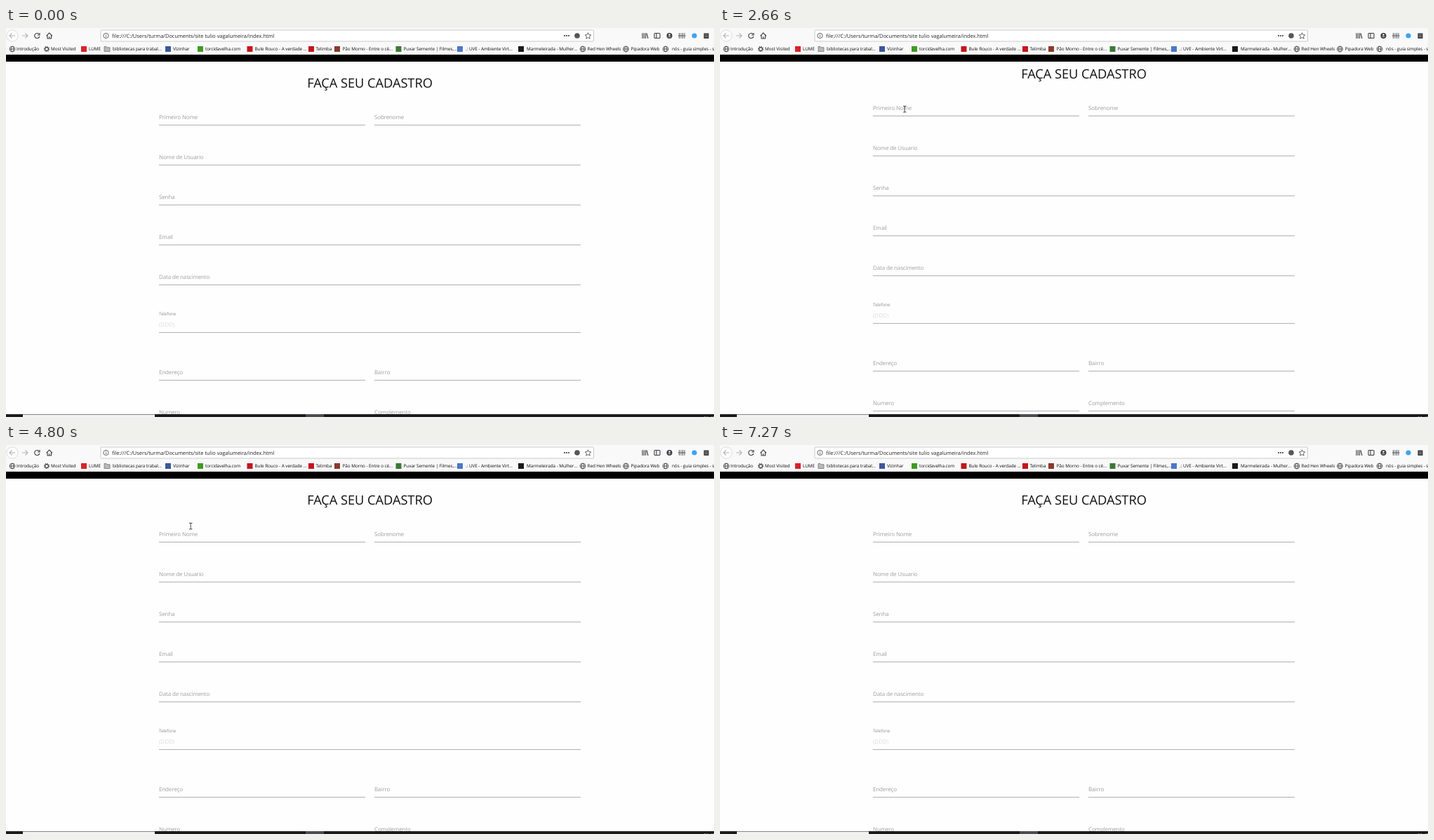
An HTML page that plays this animation: 1009 px wide and 555 px high, repeating every 8 s.

```html
<!DOCTYPE html>
<html lang="pt-BR">
<head>
<meta charset="utf-8">
<title>Cadastro</title>
<style>
  html, body { margin: 0; width: 100%; height: 100%; overflow: hidden; background: #fff; }
  svg { display: block; width: 100vw; height: 100vh; }
  text { font-family: "Open Sans", "Noto Sans", sans-serif; text-rendering: geometricPrecision; white-space: pre; }
  .title { font-size: 18.3px; letter-spacing: -.06px; fill: #111; text-anchor: middle; }
  .label { font-size: 8px; letter-spacing: -.13px; fill: #9e9e9e; }
  .small { font-size: 6.3px; letter-spacing: -.12px; fill: #8f8f8f; }
  .hint { font-size: 8px; fill: #dcdcdc; }
  .send { font-size: 7.5px; letter-spacing: .3px; fill: #fff; text-anchor: middle; }
  .url { font-size: 7.4px; fill: #222; }
  .mark { font-size: 6.4px; letter-spacing: -.06px; fill: #0c0c0d; }
  .rule { stroke: #b0b0b0; }
  .ink { fill: none; stroke: #3c3c40; stroke-width: 1.1; }
  .thin { stroke-width: .8; }
  .dim { stroke: #b4b4b6; }
</style>
</head>
<body>
<svg viewBox="0 0 1009 555" preserveAspectRatio="none">
  <defs><clipPath id="view"><rect y="48" width="1009" height="503"/></clipPath></defs>
  <rect width="1009" height="555" fill="#fefefe"/>
  <g clip-path="url(#view)"><g id="page"></g></g>

  <rect width="1009" height="38" fill="#f9f9fa"/>
  <rect y="38" width="1009" height="10" fill="#000"/>
  <rect x="135" y="3" width="702.5" height="16" rx="1" fill="#fff" stroke="#c4c4c6" stroke-width=".9"/>
  <g class="ink">
    <circle cx="9" cy="11" r="8.2" fill="#fcfcfc" stroke="#d0d0d2" stroke-width=".7"/>
    <path class="dim" d="M13 11H5M8.5 7.5L5 11L8.5 14.5M23 11H31M27.5 7.5L31 11L27.5 14.5"/>
    <path d="M47 8.7A3.6 3.6 0 1 0 47.8 12M48 7V10H45"/>
    <path d="M57.5 11.3L61.7 7L66 11.3M59 10.5V15H64.5V10.5M61.7 15V12.3"/>
    <circle class="thin" cx="142.5" cy="11" r="3.6"/>
    <path class="thin" d="M142.5 10.4V13M142.5 8.7V9.6"/>
    <path class="thin" d="M829.5 6.8L830.8 9.7L833.8 10L831.5 12.1L832.2 15.2L829.5 13.6L826.8 15.2L827.5 12.1L825.2 10L828.2 9.7Z"/>
    <path d="M907 7.2V15M909.3 7.2V15M911.6 7.2V15M913 7.5L915 15"/>
    <rect x="924" y="7.5" width="8" height="7" rx="1"/><path d="M927 7.5V14.5"/>
    <path class="thin" d="M959.5 7V15M962 7V15M964.5 7V15M967 7V15M958 11H968.5"/>
  </g>
  <g fill="#3c3c40">
    <circle cx="796" cy="11" r="1.1"/><circle cx="799" cy="11" r="1.1"/><circle cx="802" cy="11" r="1.1"/>
    <circle cx="814" cy="11" r="3.8" fill="#55555a"/>
    <circle cx="945.5" cy="11" r="4"/>
    <circle cx="945.5" cy="9.8" r="1.3" fill="#fff"/><path d="M943 13Q945.5 10.8 948 13Z" fill="#fff"/>
    <circle cx="981" cy="11" r="3.6" fill="#3fa4f0"/>
    <rect x="994.5" y="7.5" width="7" height="7.5"/>
    <path d="M996 10H1000M996 12.5H1000" stroke="#ddd" stroke-width=".6"/>
  </g>
  <text class="url" x="151" y="13.8">file:///C:/Users/turma/Documents/site tulio vagalumeira/index.html</text>
  <g id="marks"></g>

  <rect y="551" width="1009" height="4" fill="#1b1b1e"/>
  <rect x="24" y="551.5" width="188" height="3.5" fill="#f2f2f2"/>
  <rect x="427" y="551" width="26" height="4" fill="#4c4c50"/>
  <text x="994" y="558.5" font-size="6.3" fill="#ddd">20:48</text>

  <g id="cursor">
    <path id="arrow" d="M0 0V8.4L2 6.7L3.4 9.7L4.6 9.2L3.3 6.2H5.8Z" fill="#fff" stroke="#111" stroke-width=".75"/>
    <path id="beam" d="M-2 -4.5H2.5M0.2 -4.5V4M-2 4H2.5" fill="none" stroke="#111" stroke-width=".75"/>
  </g>
</svg>
<script>
const LOOP = 8000, TICK = 79, MAX_SCROLL = 57;
const $ = id => document.getElementById(id);
const text = (cls, x, y, s) => `<text class="${cls}" x="${x}" y="${y}">${s}</text>`;

// Form
const LEFT = 218, MID = 525, RIGHT = 819;
const rule = (x1, x2, y) => `<path class="rule" d="M${x1} ${y}H${x2}"/>`;
const field = (y, s) => text('label', LEFT, y, s) + rule(LEFT, RIGHT, y + 8.5);
const pair = (y, a, b) =>
  text('label', LEFT, y, a) + rule(LEFT, 512, y + 8.5) +
  text('label', MID, y, b) + rule(MID, RIGHT, y + 8.5);

$('page').innerHTML =
  text('title', 518.5, 84.5, 'FAÇA SEU CADASTRO') +
  pair(130, 'Primeiro Nome', 'Sobrenome') +
  ['Nome de Usuario', 'Senha', 'Email', 'Data de nascimento']
    .map((s, i) => field(187 + 57 * i, s)).join('') +
  text('small', LEFT, 409.5, 'Telefone') + text('hint', LEFT, 425.5, '(DDD)') + rule(LEFT, RIGHT, 434.5) +
  pair(494, 'Endereço', 'Bairro') +
  pair(551, 'Numero', 'Complemento') +
  `<rect x="487" y="584" width="46" height="20.5" rx="1.5" fill="#000" opacity=".16"/>
   <rect x="487.5" y="583" width="45" height="20" rx="1" fill="#26a69a"/>` +
  text('send', 510.2, 596.3, 'ENVIAR');

// Bookmarks bar
const globe = x => `<g class="ink thin"><circle cx="${x}" cy="30" r="3.9"/>
  <ellipse cx="${x}" cy="30" rx="1.7" ry="3.9"/><path d="M${x - 4} 30H${x + 4}"/></g>`;
const gear = x => `<g class="ink"><circle cx="${x}" cy="30" r="2.4"/>
  <circle cx="${x}" cy="30" r="3.5" stroke-dasharray="1.3 1.45"/></g>`;
const folder = x => `<path d="M${x - 4} 33.5V26.5H${x - 1}L${x} 27.8H${x + 4}V33.5Z"
  fill="#b9b9b9" stroke="#77777a" stroke-width=".8"/>`;
const square = color => x => `<rect x="${x - 4}" y="26" width="8" height="8" fill="${color}"/>`;

$('marks').innerHTML = [
  [globe, 9, 15, 'Introdução'],
  [gear, 58, 64, 'Most Visited'],
  [square('#d8232a'), 111, 118, 'LUME'],
  [folder, 144, 152, 'bibliotecas para trabal...'],
  [square('#3b5998'), 231, 238, 'Vizinhar'],
  [square('#3f9b1f'), 277, 284, 'torcidavelha.com'],
  [square('#c4161c'), 347.5, 354.5, 'Bule Rouco - A verdade ...'],
  [square('#c4161c'), 435, 441.5, 'Telimba'],
  [square('#8a3a2a'), 472, 479.5, 'Pão Morno - Entre o cé...'],
  [square('#3c7a35'), 559.5, 566.5, 'Puxar Semente | Filmes,...'],
  [square('#4a78c8'), 647, 655, '.: UVE - Ambiente Virt...'],
  [square('#1a1a1a'), 734, 742, 'Marmeleirada - Mulher...'],
  [globe, 822, 828.5, 'Red Hen Wheels'],
  [globe, 883.5, 890.5, 'Pipadora Web'],
  [globe, 940, 949, 'nós - guia simples - sem'],
].map(([icon, ix, tx, s]) => icon(ix) + text('mark', tx, 32.4, s)).join('');

// Each wheel turn: start, length, direction
const WHEEL = [
  [1650, 530, 1], [2262, 576, -1],
  [3230, 380, 1], [4090, 445, -1],
  [6190, 370, 1], [6560, 370, -1],
];
// Pointer path: time, x, y
const PATH = [
  [70, 953, 546], [230, 760, 380], [380, 540, 190], [530, 411, 98], [600, 411, 98],
  [900, 300, 116], [1080, 256, 111], [1170, 256, 111], [1470, 263, 116],
  [4950, 263, 116], [5190, 255, 75], [5350, 268, 43], [5590, 315, 72], [5830, 342, 109], [5900, 347, 112],
  [6600, 347, 112], [6780, 590, 118], [7020, 995, 144], [7100, 995, 144], [7160, 1004, 145],
];
const ARROW_TIMES = [[0, 1300], [1780, 2600], [3300, 3600], [5050, LOOP]];

const clamp = v => Math.min(1, Math.max(0, v));
const ease = v => v * v * (3 - 2 * v);

const scrollAt = t => MAX_SCROLL *
  WHEEL.reduce((sum, [start, len, dir]) => sum + dir * ease(clamp((t - start) / len)), 0);

function pointAt(t) {
  const i = PATH.findIndex(p => p[0] > t);
  if (i === 0) return PATH[0].slice(1);
  if (i < 0) return PATH[PATH.length - 1].slice(1);
  const [t0, x0, y0] = PATH[i - 1], [t1, x1, y1] = PATH[i];
  const k = (t - t0) / (t1 - t0);
  return [x0 + (x1 - x0) * k, y0 + (y1 - y0) * k];
}

function render(time) {
  const t = 2110 + TICK * Math.floor((time - 2100) / TICK);
  $('page').setAttribute('transform', `translate(0 ${-Math.round(scrollAt(t))})`);
  const [x, y] = pointAt(t);
  const arrow = ARROW_TIMES.some(([a, b]) => t >= a && t < b);
  $('cursor').setAttribute('transform', `translate(${x} ${y})`);
  $('cursor').setAttribute('display', time >= 70 && time < 7250 ? 'inline' : 'none');
  $('arrow').setAttribute('display', arrow ? 'inline' : 'none');
  $('beam').setAttribute('display', arrow ? 'none' : 'inline');
}

const begin = performance.now();
function loop() {
  render((performance.now() - begin) % LOOP);
  requestAnimationFrame(loop);
}
loop();
</script>
</body>
</html>
```
